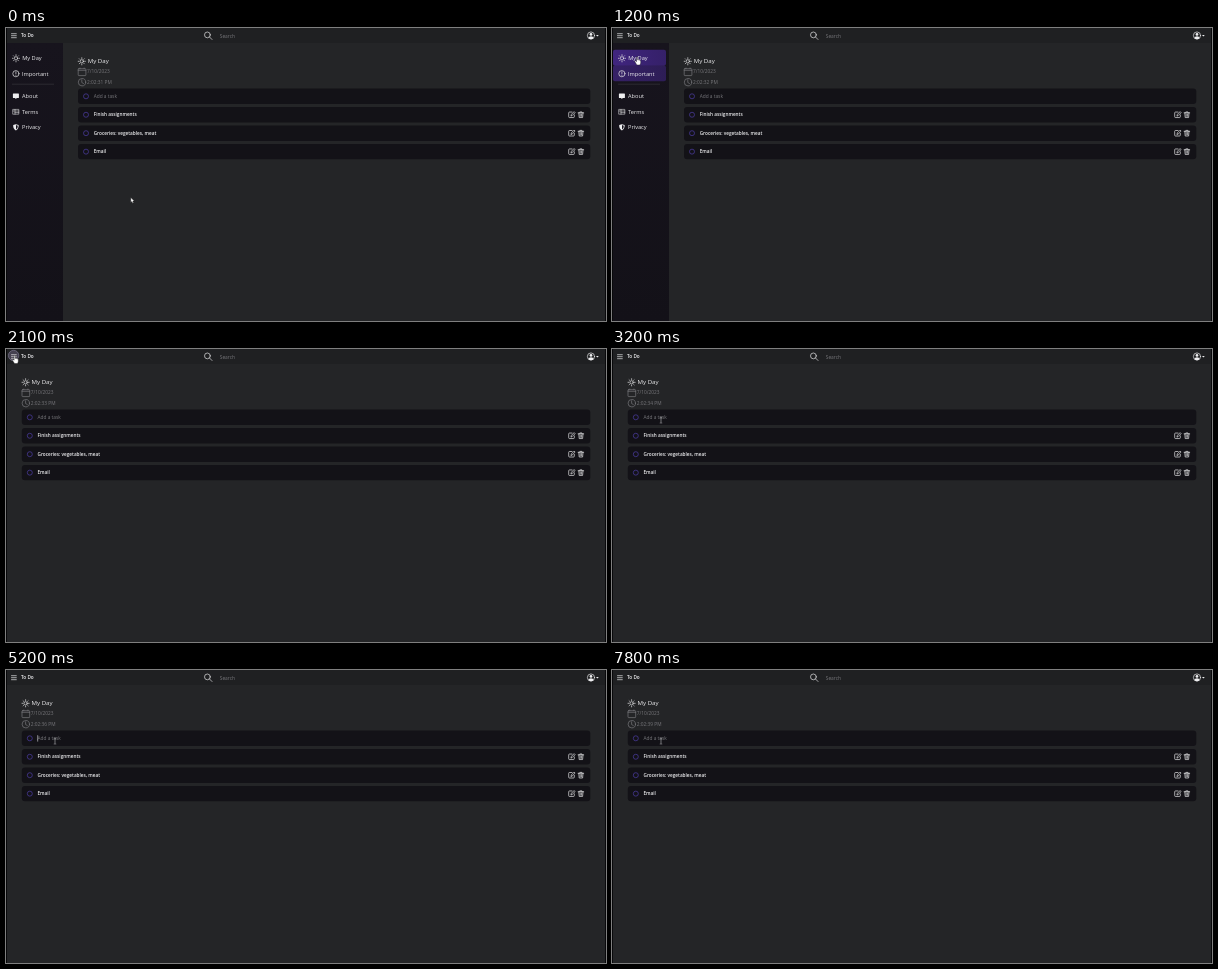
Recreate the animation shown at these times as an HTML page. Size 600 px wide and 293 px high, loop 8 s.

```html
<!DOCTYPE html>
<html lang="en">
<head>
<meta charset="utf-8">
<title>To Do</title>
<style>
  html, body { margin: 0; width: 100%; height: 100%; overflow: hidden; background: #242527; }
  svg { display: block; width: 100vw; height: 100vh; }
  text { font: 400 4.8px "Open Sans", "Noto Sans", sans-serif; fill: #eeeef0; }
  .bold { font-weight: 600; font-size: 4.7px; }
  .link { font-size: 5.65px; }
  .muted { fill: #77777b; }
  .line { fill: none; stroke: #e4e4e6; stroke-width: .7; stroke-linecap: round; stroke-linejoin: round; }
  .dim { stroke: #77777b; }
  .card { fill: #131217; }
  .check { fill: none; stroke: #4a3b9c; stroke-width: .75; }
  .solid { fill: #eeeef0; }
</style>
</head>
<body>
<svg viewBox="0 0 600 293" preserveAspectRatio="none">
  <defs>
    <linearGradient id="side" x2="0" y2="1">
      <stop stop-color="#17141d"/><stop offset="1" stop-color="#131118"/>
    </linearGradient>
    <linearGradient id="glow">
      <stop stop-color="#40257f"/><stop offset="1" stop-color="#352069"/>
    </linearGradient>
    <g id="sun" class="line">
      <circle r="1.65"/>
      <path d="M0-3.6v.8M0 2.8v.8M-3.6 0h.8M2.8 0h.8M-2.5-2.5l.5.5M2-2l.5-.5M-2.5 2.5l.5-.5M2 2l.5.5"/>
    </g>
    <g id="tools" class="line">
      <path d="M3.1-2.7H.6q-.8 0-.8.8V2q0 .8.8.8h4q.8 0 .8-.8V.2M2.1 1l.4-1.4L5.2-3.1l1 1L3.5.6z"/>
      <path d="M9.2-1.9h5.6M10.9-1.9v-.9h2.2v.9M9.9-1.9l.4 4.7h3.4l.4-4.7M11.3-.7v2.3M12.7-.7v2.3"/>
    </g>
  </defs>

  <rect width="600" height="293" fill="#242527"/>

  <g id="content">
    <use href="#sun" x="75.8" y="33.3"/>
    <text x="81.7" y="35.2" style="font-size:6.1px;font-weight:500">My Day</text>
    <g class="line dim">
      <path d="M72.9 40.7h6.3q.7 0 .7.7v5.5q0 .7-.7.7h-6.3q-.7 0-.7-.7v-5.5q0-.7.7-.7zM72.2 42.3h7.7M74 40v.7M78.1 40v.7"/>
      <circle cx="76" cy="54.2" r="3.7"/>
      <path d="M75.8 51.8v2.7l1.7 1"/>
    </g>
    <text class="muted" x="81" y="45.4">7/10/2023</text>
    <text class="muted" x="81" y="55.8" id="clock"></text>
  </g>

  <g id="rows"></g>
  <path id="caret" d="M31.7 65.2v6.4" stroke="#dcdce0" stroke-width=".6"/>

  <g id="sidebar">
    <rect x="1" y="15" width="56" height="278" fill="url(#side)"/>
    <rect id="hotDay" x="1" y="21.8" width="53" height="16" rx="2" fill="url(#glow)"/>
    <rect id="hotImportant" x="1" y="37.6" width="53" height="15.6" rx="2" fill="url(#glow)"/>
    <use href="#sun" x="10" y="30.3"/>
    <g class="line">
      <circle cx="9.9" cy="45.7" r="3.1"/>
      <path d="M9.9 43.9v2M9.9 47.3v.1"/>
      <path d="M7.1 81.4h5.7v4.8H7.1zM7.1 83h5.7M9 81.4v4.8M8.9 84.6h3.9" style="stroke-width:.55"/>
    </g>
    <path d="M6 56.2h42" stroke="#3a393f" stroke-width=".6"/>
    <path class="solid" d="M7.4 65.6h5q.5 0 .5.5v3.4q0 .5-.5.5h-1.6l-.9 1-.9-1H7.4q-.5 0-.5-.5v-3.4q0-.5.5-.5z"/>
    <path class="solid" d="M9.9 96.2l2.7.9q.3 3.8-2.7 5.4-3-1.6-2.7-5.4z"/>
    <path d="M10 97.1l1.8.6q.2 2.7-1.8 3.9z" fill="#17141d"/>
    <text class="link" x="16.2" y="32.2">My Day</text>
    <text class="link" x="16" y="47.6">Important</text>
    <text class="link" x="16" y="69.9">About</text>
    <text class="link" x="16" y="85.5">Terms</text>
    <text class="link" x="16" y="101.1">Privacy</text>
  </g>

  <rect width="600" height="15" fill="#1f2022"/>
  <circle id="press" cx="7.6" cy="6.5" r="5.2" fill="#454150" stroke="#85809a" stroke-width=".6"/>
  <path class="line" d="M5.5 5.7h4.8M5.5 7.7h4.8M5.5 9.7h4.8"/>
  <text class="bold" x="15" y="9.4">To Do</text>
  <g class="line"><circle cx="201.4" cy="6.9" r="2.9"/><path d="M203.5 9l2.5 2.5"/></g>
  <text class="muted" x="213.8" y="9.6">Search</text>
  <circle class="line" cx="585" cy="7.5" r="3.6"/>
  <circle class="solid" cx="585" cy="6.4" r="1.35"/>
  <path class="solid" d="M582.3 10q.6-1.7 2.7-1.7t2.7 1.7q-1 1.2-2.7 1.2t-2.7-1.2zM590 6.9h2.8l-1.4 1.5z"/>

  <path d="M.5 0v293M599.5 0v293" stroke="#08080a"/>

  <g id="arrow">
    <path d="M0 0v4.9l1.1-1 .8 1.7.9-.4-.8-1.7h1.5z" fill="#fff" stroke="#111" stroke-width=".35"/>
  </g>
  <g id="hand">
    <path d="M-.7.7q0-.8.6-.8t.6.8v2.4q.6-.4 1.1.1.6-.3 1 .2.9-.2.9.7v1.7q0 1-.6 1.9v.5H-.6v-.6L-2.3 5q-.5-.8.2-1 .5-.1 1.4.9z" fill="#fff" stroke="#111" stroke-width=".4"/>
  </g>
  <g id="beam">
    <path d="M-1.2-3q1 0 1.2.6.2-.6 1.2-.6M0-2.4v4.9M-1.2 3q1 0 1.2-.5.2.5 1.2.5" fill="none" stroke="#c8c8cc" stroke-width=".55"/>
  </g>
</svg>
<script>
  const LOOP = 8000, STEP = 100;
  const el = id => document.getElementById(id);
  const labels = ["Add a task", "Finish assignments", "Groceries: vegetables, meat", "Email"];

  el("rows").innerHTML = labels.map((label, i) => {
    const y = 68.3 + i * 18.45;
    return `<rect class="card" y="${y - 7.7}" height="15.4" rx="3"/>
      <g class="lead"><circle class="check" cx="80" cy="${y}" r="2.5"/>
      <text class="${i ? "bold" : "muted"}" x="87.7" y="${y + 1.7}">${label}</text></g>
      ${i ? `<use href="#tools" x="562.9" y="${y}"/>` : ""}`;
  }).join("");
  const cards = document.querySelectorAll(".card");
  const leads = document.querySelectorAll(".lead");

  // [time, pointer shape, x, y]
  const pointer = [
    [0, "arrow", 124.8, 169.6], [100, "arrow", 126, 170.5], [200, "arrow", 127.3, 171.8],
    [300, "arrow", 127, 171.5], [500, "arrow", 125, 169], [600, "arrow", 118, 160],
    [700, "arrow", 106, 142], [800, "arrow", 90, 117], [900, "arrow", 71, 89],
    [1000, "arrow", 50, 62], [1100, "hand", 34, 43], [1200, "hand", 25.2, 28.8],
    [1300, "hand", 18, 20], [1400, "hand", 10.2, 8.7], [1500, "hand", 8.8, 6.4],
    [2900, "arrow", 14, 14], [3000, "arrow", 27, 37], [3100, "beam", 43, 65],
    [3200, "beam", 49, 71], [4100, "beam", 51.5, 73], [4200, "beam", 50.2, 72],
    [4300, "beam", 49, 71]
  ];
  // [time, opacity of "My Day" glow, opacity of "Important" glow]
  const glow = [[0, 0, 0], [1100, 0, 1], [1200, 1, .75], [1300, .6, .2], [1400, 0, 0]];
  const caret = [[0, 0], [4200, 1], [4700, 0], [5200, 1], [5700, 0], [6300, 1], [6700, 0], [7300, 1], [7700, 0]];

  const at = (table, t) => table.findLast(row => row[0] <= t);
  const show = (id, on) => el(id).setAttribute("opacity", +on);
  const shift = (node, x, y = 0) => node.setAttribute("transform", `translate(${x} ${y})`);

  function draw(t) {
    const open = t < 2100;
    const dx = open ? 0 : -56.2;
    shift(el("content"), dx);
    leads.forEach(node => shift(node, dx));
    cards.forEach(card => {
      card.setAttribute("x", 72 + dx);
      card.setAttribute("width", 512.3 - dx);
    });
    show("sidebar", open);
    show("press", t >= 2000 && t < 2200);
    el("clock").textContent = `2:02:${31 + Math.floor((t + 300) / 1000)} PM`;

    const [, day, important] = at(glow, t);
    show("hotDay", day);
    show("hotImportant", important);
    show("caret", at(caret, t)[1]);

    const [, shape, x, y] = at(pointer, t);
    for (const id of ["arrow", "hand", "beam"]) show(id, id === shape);
    shift(el(shape), x, y);
  }

  const start = performance.now();
  function tick() {
    const t = (performance.now() - start) % LOOP;
    draw(Math.floor(t / STEP) * STEP);
    requestAnimationFrame(tick);
  }
  tick();
</script>
</body>
</html>
```
